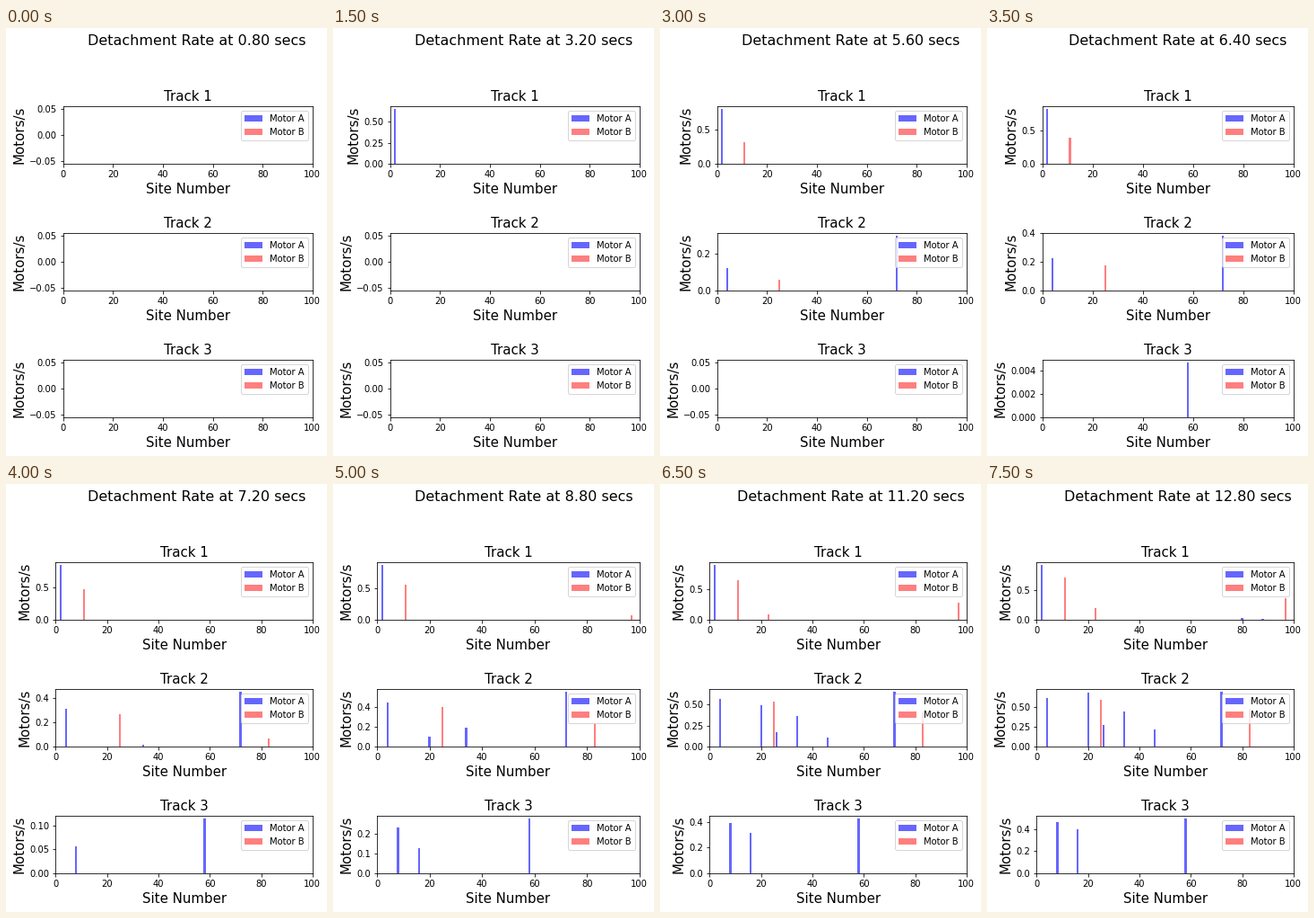
Write a matplotlib script that moves like this. It is 358 px wide and 476 px high and loops after 8 s.

```python
import matplotlib.pyplot as plt
from matplotlib.animation import FuncAnimation

W, H, DPI = 358, 476, 72
PAD = 7.2                      # outer margin in px
RIGHT = 341.8                  # right edge of all axes in px
BOTTOM, HEIGHT, PITCH = 43.2, 64.2, 140.7
FRAMES, INTERVAL, STEP = 16, 500, 0.8

STYLES = {"A": ("blue", 0.6), "B": ("red", 0.5)}

# per track and motor: (site, times at which a motor there starts detaching)
EVENTS = [
    {"A": [(2, [1.12]), (80, [12.29]), (88, [12.5])],
     "B": [(11, [3.82]), (23, [10.22]), (97, [8.08])]},
    {"A": [(4, [4.93]), (20, [7.9, 9.02]), (26, [9.28]),
           (34, [7.1]), (46, [10.0]), (72, [3.94])],
     "B": [(25, [5.27]), (83, [6.7])]},
    {"A": [(8, [6.8]), (16, [7.68]), (58, [6.37])],
     "B": []},
]


def rate(starts, t):
    return sum(max(0.0, 1 - s / t) for s in starts)


def place(ax, row, left):
    bottom = BOTTOM + (2 - row) * PITCH
    ax.set_position([left / W, bottom / H, (RIGHT - left) / W, HEIGHT / H])


def make_track(row, events):
    ax = fig.add_axes([0.18, 0.1, 0.7, 0.1])
    place(ax, row, 64)
    bars = []
    for motor, (color, alpha) in STYLES.items():
        sites = [site for site, _ in events[motor]] or [0]
        starts = [s for _, s in events[motor]] or [[]]
        group = ax.bar(sites, [0] * len(sites), width=0.8, color=color,
                       alpha=alpha, label=f"Motor {motor}")
        bars += zip(group, starts)
    ax.set_xlim(0, 100)
    ax.set_title(f"Track {row + 1}", fontsize=15)
    ax.set_xlabel("Site Number", fontsize=15)
    ax.set_ylabel("Motors/s", fontsize=15)
    ax.legend(loc="upper right")
    return ax, bars


plt.rcParams["font.family"] = "DejaVu Sans"
fig = plt.figure(figsize=((W + 1e-6) / DPI, (H + 1e-6) / DPI), dpi=DPI,
                 facecolor="white")
heading = fig.text(212.4 / W, 1 - PAD / H, "", fontsize=16,
                   ha="center", va="top")
tracks = [make_track(row, events) for row, events in enumerate(EVENTS)]


def update(i):
    t = STEP * (i + 1)
    heading.set_text(f"Detachment Rate at {t:.2f} secs")
    for row, (ax, bars) in enumerate(tracks):
        place(ax, row, 64)
        top = 0
        for bar, starts in bars:
            value = rate(starts, t)
            bar.set_height(value)
            top = max(top, value)
        if top > 0:
            ax.set_ylim(0, 1.05 * top)
        else:
            ax.set_ylim(-0.055, 0.055)

    # fit the left edge to the widest axis labels
    left = 64 + PAD - min(ax.get_tightbbox().x0 for ax, _ in tracks)
    for row, (ax, _) in enumerate(tracks):
        place(ax, row, left)
    return []


anim = FuncAnimation(fig, update, frames=FRAMES, interval=INTERVAL,
                     repeat=True, repeat_delay=0, blit=False)
plt.show()
```
